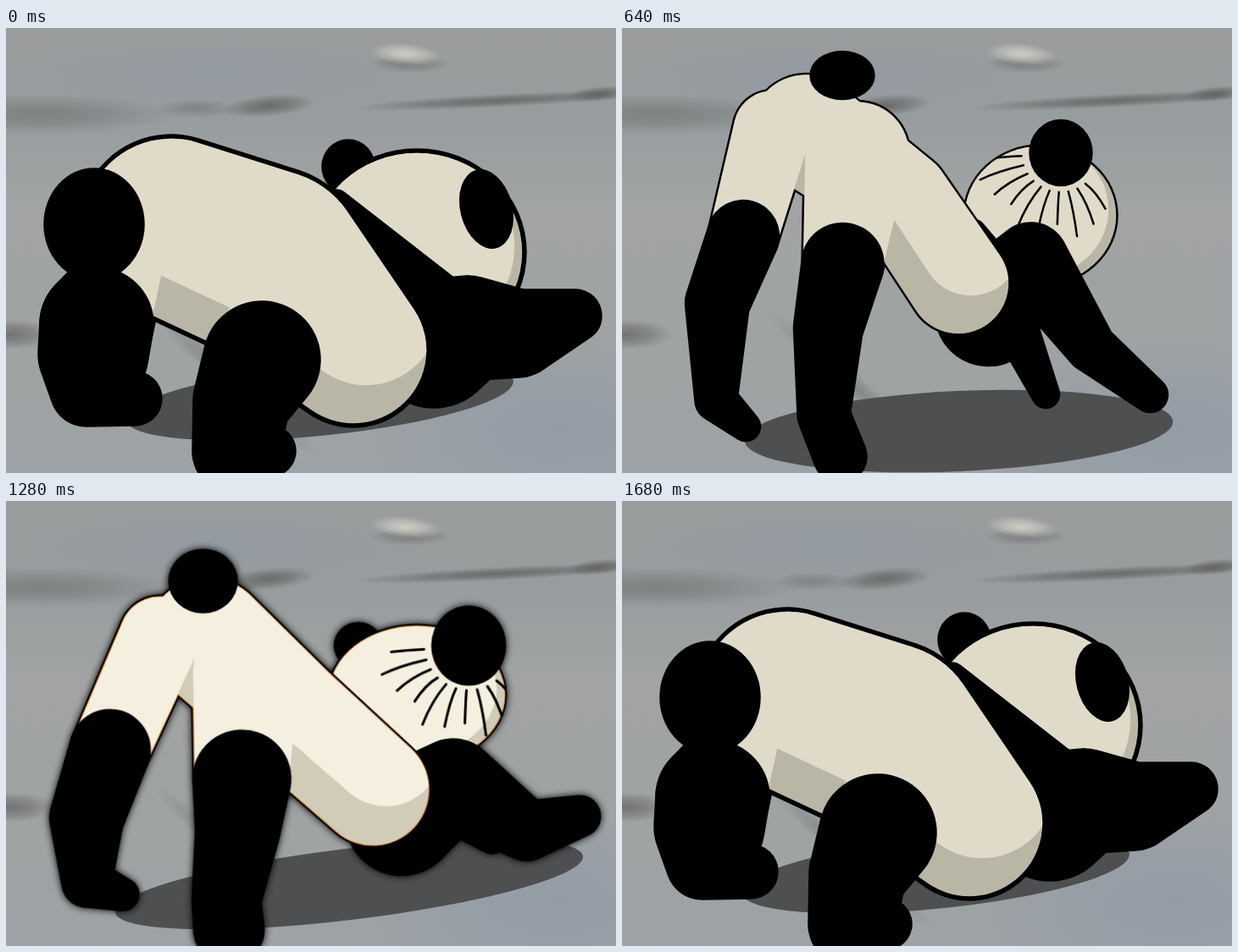
Write an HTML page with a canvas that moves like this. It is 720 by 526 pixels and loops after 1.76 s.

```html
<!DOCTYPE html>
<html lang="en">
<head>
<meta charset="utf-8">
<title>Stretching panda</title>
<style>
html, body { margin: 0; width: 100%; height: 100%; overflow: hidden; background: #a0a4a5; }
canvas { display: block; width: 100vw; height: 100vh; }
</style>
</head>
<body>
<canvas id="stage" width="720" height="526"></canvas>
<script>
const W = 720, H = 526, LOOP = 1760, STEP = 80;

// Limbs are chains of joints [x, y, radius]; ovals are [x, y, rx, ry, turn].
const lying = {
  line: 5.5,
  shadow: [370, 440, 230, 42, -.1],
  tail: [104, 232, 57, 64, 0],
  head: [485, 265, 127, 120, 0],
  farEar: [404, 164, 29, 30, 0],
  nearEar: [567, 214, 28, 45, -.25],
  body: [[195, 235, 107], [310, 280, 115], [410, 381, 89]],
  farLeg: [[150, 270, 40], [107, 350, 65], [103, 385, 63], [95, 428, 41], [152, 438, 30]],
  nearLeg: [[320, 330, 50], [302, 392, 67], [278, 440, 55], [272, 500, 50], [312, 500, 28]],
  nearArm: [[390, 205, 12], [505, 373, 74], [545, 355, 60], [604, 361, 50], [672, 340, 29]],
  farArm: [[560, 370, 20], [590, 375, 20]]
};
const rising = {
  line: 3,
  shadow: [405, 453, 278, 42, -.12],
  tail: [235, 100, 39, 36, 0],
  head: [483, 232, 103, 81, 0],
  farEar: [415, 175, 27, 26, 0],
  nearEar: [543, 175, 42, 45, 0],
  body: [[240, 167, 72], [335, 255, 68], [432, 342, 66]],
  farLeg: [[185, 165, 48], [127, 296, 46], [100, 375, 42], [100, 450, 28], [142, 464, 18]],
  nearLeg: [[285, 205, 63], [280, 330, 56], [275, 390, 48], [262, 470, 39], [265, 505, 40]],
  nearArm: [[440, 298, 10], [465, 377, 64], [525, 335, 51], [610, 390, 34], [672, 373, 23]],
  farArm: [[540, 380, 20], [570, 402, 14]]
};
const stretched = {
  line: 2,
  shadow: [390, 500, 228, 53, .03],
  tail: [285, 12, 36, 20, 0],
  head: [505, 211, 78, 85, 0],
  farEar: [597, 218, 13, 31, 0],
  nearEar: [493, 120, 31, 32, 0],
  body: [[195, 75, 62], [325, 150, 50], [362, 262, 55]],
  farLeg: [[170, 75, 46], [159, 196, 38], [125, 275, 33], [122, 430, 21], [150, 478, 16]],
  nearLeg: [[270, 92, 62], [241, 228, 40], [212, 318, 33], [214, 445, 22], [250, 508, 22]],
  nearArm: [[392, 180, 14], [400, 296, 61], [440, 213, 36], [497, 365, 24], [575, 494, 18]],
  farArm: [[400, 350, 28], [430, 464, 18]]
};

const stage = document.getElementById('stage').getContext('2d');
const newLayer = () => Object.assign(document.createElement('canvas'), { width: W, height: H }).getContext('2d');
const backdrop = newLayer(), figure = newLayer();

function mix(a, b, f) {
  if (typeof a === 'number') return a + (b - a) * f;
  if (Array.isArray(a)) return a.map((v, i) => mix(v, b[i], f));
  return Object.fromEntries(Object.keys(a).map(key => [key, mix(a[key], b[key], f)]));
}

// 0 lying, 1 rising, 2 stretched; moves on in 80 ms steps.
function progressAt(t) {
  const step = Math.floor(t / STEP);
  const k = step < 14 ? Math.min(8, Math.max(0, step - 2)) : Math.max(0, 8 - (step - 13) * 4 / 3);
  return k < 1 ? 0 : k < 4 ? .15 + .85 * (k - 1) / 3 : 1 + (k - 4) / 4;
}

// Outline around neighbouring circles, widened by grow.
function chain(joints, grow = 0) {
  const path = new Path2D();
  for (let i = 1; i < joints.length; i++) {
    const [x1, y1, r1] = joints[i - 1], [x2, y2, r2] = joints[i];
    const slope = (r1 - r2) / Math.hypot(x2 - x1, y2 - y1);
    const dir = Math.atan2(y2 - y1, x2 - x1);
    const a = Math.acos(Math.max(-1, Math.min(1, slope)));
    const link = new Path2D();
    link.arc(x1, y1, r1 + grow, dir + a, dir - a + Math.PI * 2);
    link.arc(x2, y2, r2 + grow, dir - a, dir + a);
    link.closePath();
    path.addPath(link);
  }
  return path;
}

function oval([x, y, rx, ry, turn], grow = 0) {
  const path = new Path2D();
  path.ellipse(x, y, rx + grow, ry + grow, turn, 0, Math.PI * 2);
  return path;
}

function moved(path, x, y) {
  const copy = new Path2D();
  copy.addPath(path, new DOMMatrix([1, 0, 0, 1, x, y]));
  return copy;
}

function soft(x, y, rx, ry, rgb, alpha, turn = 0) {
  const c = backdrop, g = c.createRadialGradient(0, 0, 0, 0, 0, 1);
  g.addColorStop(0, `rgba(${rgb},${alpha})`);
  g.addColorStop(.5, `rgba(${rgb},${alpha * .6})`);
  g.addColorStop(1, `rgba(${rgb},0)`);
  c.save();
  c.translate(x, y);
  c.rotate(turn);
  c.scale(rx, ry);
  c.fillStyle = g;
  c.fillRect(-1, -1, 2, 2);
  c.restore();
}

function paintBackdrop() {
  const blue = '140,151,168', dark = '95,95,92', light = '210,209,200';
  const g = backdrop.createLinearGradient(0, 0, 0, H);
  ['#9a9d9b', '#979c9f', '#a1a4a3', '#a0a3a3', '#9fa3a4', '#9ca2a6']
    .forEach((color, i, all) => g.addColorStop(i / (all.length - 1), color));
  backdrop.fillStyle = g;
  backdrop.fillRect(0, 0, W, H);
  soft(250, 50, 260, 45, blue, .4);
  soft(650, 470, 230, 110, blue, .6);
  soft(40, 102, 160, 24, dark, .45);
  soft(225, 95, 50, 11, dark, .4);
  soft(310, 92, 56, 13, dark, .8, -.1);
  soft(580, 86, 170, 8, dark, .8, -.05);
  soft(700, 78, 40, 9, dark, .9, -.1);
  soft(476, 42, 48, 11, dark, .5);
  soft(472, 31, 42, 13, light, .9, .1);
  soft(5, 362, 55, 18, dark, .7);
  soft(270, 420, 130, 14, dark, .4, .72);
}

function paintFigure(pose, p, hot) {
  const c = figure, edge = pose.line / 2;
  const cream = hot ? '#f5efdf' : '#e0dac8', shade = hot ? '#d0ccb8' : '#b9b6a5';
  const fill = (path, color = '#000') => {
    c.fillStyle = color;
    c.fill(path);
  };
  // Fur shapes melt into one another; only their joint outline shows.
  const fur = (shape, parts, dx, dy) => {
    parts.forEach(part => fill(shape(part, edge)));
    if (hot) parts.forEach(part => fill(shape(part, 1 - edge), '#e08a2c'));
    const [main, ...rest] = parts.map(part => shape(part, -edge));
    fill(main, shade);
    c.save();
    c.clip(main);
    fill(moved(main, dx, dy), cream);
    c.restore();
    rest.forEach(path => fill(path, cream));
  };
  const tail = () => fill(oval(pose.tail, edge));

  c.clearRect(0, 0, W, H);
  fill(chain(pose.farArm, edge));
  fill(oval(pose.farEar, edge));
  fur(oval, [pose.head], -9, -7);
  if (p > .6) paintTufts(c, pose);
  if (p >= 1.75) paintFace(fill, pose.head);
  fill(oval(pose.nearEar, edge));
  fill(chain(pose.nearArm, edge));
  if (p > 1.5) tail();
  fur(chain, [pose.body, pose.farLeg.slice(0, 2), pose.nearLeg.slice(0, 2)], 15, -45);
  fill(chain(pose.farLeg.slice(1), edge));
  fill(chain(pose.nearLeg.slice(1), edge));
  if (p <= 1.5) tail();
}

// Tufts of fur fanning out below the near ear.
function paintTufts(c, { head, nearEar: [x, y, r], line }) {
  c.save();
  c.clip(oval(head));
  c.lineWidth = line;
  c.lineCap = 'round';
  c.beginPath();
  for (let i = 0; i < 10; i++) {
    const a = .9 + i * .24, near = r + 10, far = r + 48 + i % 3 * 8;
    c.moveTo(x + near * Math.cos(a), y + near * Math.sin(a));
    c.quadraticCurveTo(x + far * .8 * Math.cos(a), y + far * .7 * Math.sin(a),
      x + far * Math.cos(a), y + far * Math.sin(a));
  }
  c.stroke();
  c.restore();
}

function paintFace(fill, [x, y]) {
  for (const [dx, dy, size] of [[3, 14, 16], [42, 37, 11]]) {
    fill(oval([x + dx, y + dy, size * .85, size, .3]));
    fill(oval([x + dx + 2, y + dy - 5, size / 4, size / 3, 0]), '#fff');
  }
  fill(oval([x + 15, y + 57, 7, 4, .4]));
}

function draw(now) {
  const t = now % LOOP, p = progressAt(t), hot = t >= 1120 && t < 1600;
  const pose = p < 1 ? mix(lying, rising, p) : mix(rising, stretched, p - 1);
  stage.drawImage(backdrop.canvas, 0, 0);
  stage.fillStyle = '#4d4f51';
  stage.fill(oval(pose.shadow));
  paintFigure(pose, p, hot);
  stage.save();
  if (hot) {
    stage.translate(370, 400);
    stage.scale(1.018, 1.018);
    stage.translate(-370, -400);
    stage.shadowColor = '#000';
    stage.shadowBlur = 8;
  }
  stage.drawImage(figure.canvas, 0, 0);
  stage.restore();
}

paintBackdrop();
const start = performance.now();
function tick() {
  draw(performance.now() - start);
  requestAnimationFrame(tick);
}
tick();
</script>
</body>
</html>
```
